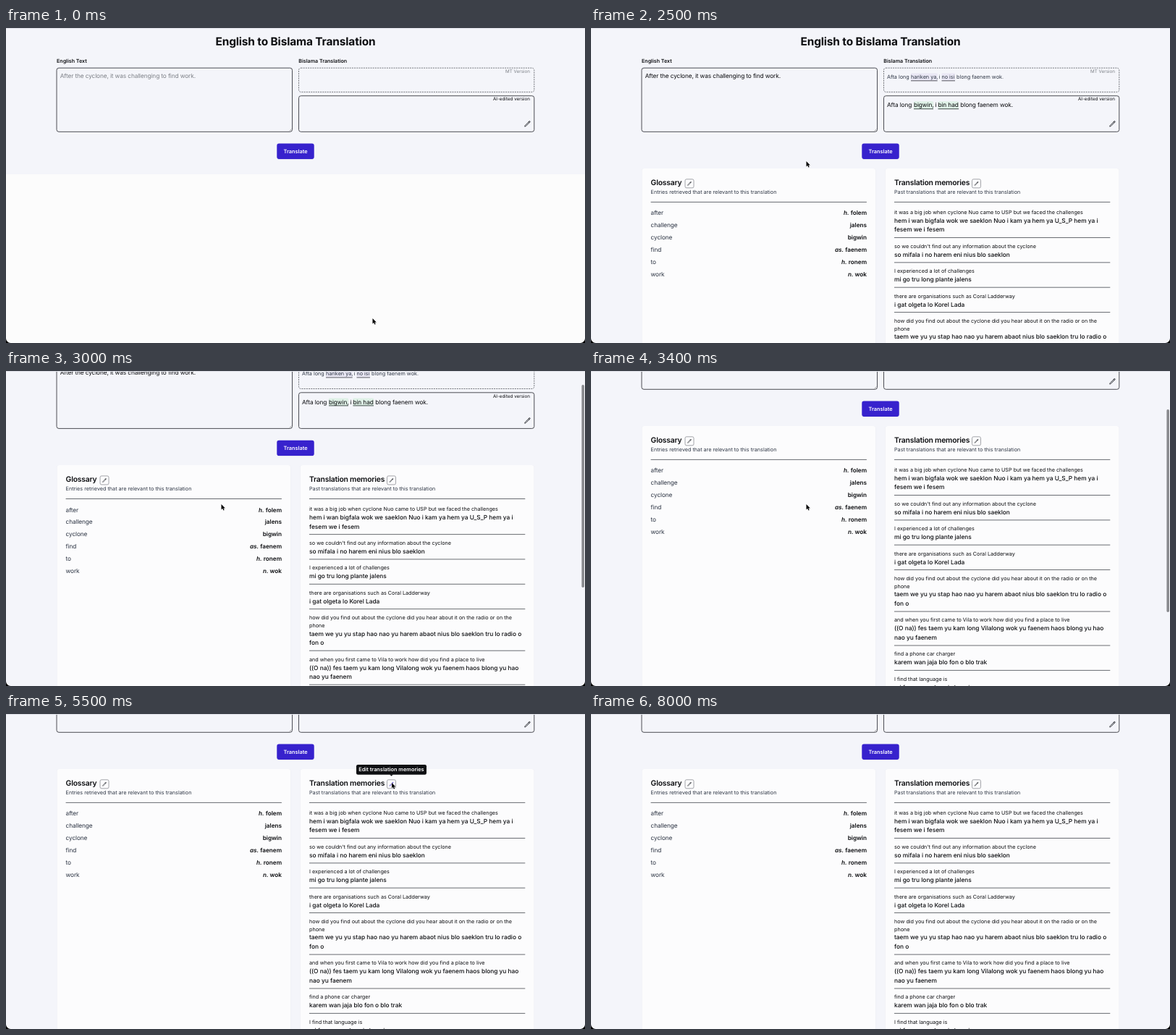
An HTML page that plays this animation: 800x435 px, repeating every 8.1 s.

```html
<!DOCTYPE html>
<html lang="en">
<head>
<meta charset="utf-8">
<title>English to Bislama Translation</title>
<style>
html, body { margin: 0; width: 100%; height: 100%; overflow: hidden; background: #fcfcfc; }
svg { display: block; width: 100vw; height: 100vh; }
text { font-family: Inter, "Open Sans", sans-serif; text-rendering: geometricPrecision; fill: #0c0d10; white-space: pre; }
.title { font-size: 15.45px; font-weight: 700; letter-spacing: -.14px; text-anchor: middle; }
.label { font-size: 7.1px; font-weight: 600; }
.tag { font-size: 6.3px; text-anchor: end; }
.body { font-size: 8.3px; letter-spacing: -.12px; }
.small { font-size: 7.22px; }
.strong { font-size: 8.18px; font-weight: 600; }
.medium { font-size: 8.35px; font-weight: 500; letter-spacing: -.02px; }
.head { font-size: 10.35px; font-weight: 600; letter-spacing: -.2px; }
.btn, .tip { font-size: 7.35px; font-weight: 600; text-anchor: middle; fill: #fff; }
.end { text-anchor: end; }
.it { font-style: italic; }
.muted { fill: #7d8087; }
.slate { fill: #2d3544; }
.box { fill: none; stroke: #3a3c42; stroke-width: .9; }
.rule { stroke: #505359; stroke-width: .85; }
.pen { fill: none; stroke: #1a1c22; stroke-linecap: round; stroke-linejoin: round; }
</style>
</head>
<body>
<svg id="stage" viewBox="0 0 800 435" preserveAspectRatio="none"></svg>
<script>
const LOOP = 8100, STEP = 100;
const FILLED = 1100, RESULTS = 1500;

const text = (x, y, cls, s, id = '') =>
  `<text ${id && `id="${id}"`} x="${x}" y="${y}" class="${cls}">${s}</text>`;
const rect = (x, y, w, h, r, attrs) =>
  `<rect x="${x}" y="${y}" width="${w}" height="${h}" rx="${r}" ${attrs}/>`;
const rule = (x, y) => `<path class="rule" d="M${x} ${y}h298.3"/>`;

const pencil = (cx, cy, k, id = '') =>
  `<path ${id && `id="${id}"`} class="pen" stroke-width="2.3" transform="translate(${cx} ${cy}) scale(${k}) translate(-12 -12)"
  d="M16.9 4.5l1.7-1.7a1.9 1.9 0 1 1 2.6 2.7L6.8 19.8a4.5 4.5 0 0 1-1.9 1.1L2.3 21.7l.8-2.6a4.5 4.5 0 0 1 1.1-1.9L16.9 4.5zm0 0L19.5 7.1"/>`;

const mark = (x, w, y, fill, line) =>
  rect(x, y, w, 10, 1, `fill="${fill}"`) + rect(x, y + 10, w, .9, 0, `fill="${line}"`);

const glossary = [
  ['after', 'h.', 'folem'], ['challenge', '', 'jalens'], ['cyclone', '', 'bigwin'],
  ['find', 'as.', 'faenem'], ['to', 'h.', 'ronem'], ['work', 'n.', 'wok']
];

const memories = [
  [['it was a big job when cyclone Nuo came to USP but we faced the challenges'],
   ['hem i wan bigfala wok we saeklon Nuo i kam ya hem ya U_S_P hem ya i', 'fesem we i fesem']],
  [["so we couldn't find out any information about the cyclone"],
   ['so mifala i no harem eni nius blo saeklon']],
  [['I experienced a lot of challenges'], ['mi go tru long plante jalens']],
  [['there are organisations such as Coral Ladderway'], ['i gat olgeta lo Korel Lada']],
  [['how did you find out about the cyclone did you hear about it on the radio or on the', 'phone'],
   ['taem we yu yu stap hao nao yu harem abaot nius blo saeklon tru lo radio o', 'fon o']],
  [['and when you first came to Vila to work how did you find a place to live'],
   ['((O na)) fes taem yu kam long Vilalong wok yu faenem haos blong yu hao', 'nao yu faenem']],
  [['find a phone car charger'], ['karem wan jaja blo fon o blo trak']],
  [['I find that language is'], ['mi faenem se lanwis hem i']]
];

function card(x, title, sub, penX, id) {
  return rect(x, 194, 323.5, 560, 3, 'fill="#e9ebf1"') +
    rect(x + .4, 194, 322.7, 560, 3, 'fill="#fcfcfd"') +
    text(x + 12.6, 217.3, 'head', title) +
    rect(penX - 6, 208.8, 12, 12, 2, 'fill="none" stroke="#8e9096" stroke-width=".8"') +
    pencil(penX, 214.9, .25, id) +
    text(x + 12.6, 229.1, 'small slate', sub) +
    rule(x + 12.6, 240.4);
}

function glossaryRows() {
  return glossary.map(([en, kind, bi], i) => {
    const y = 258.4 + i * 16.9;
    const prefix = kind && `<tspan class="it">${kind}</tspan> `;
    return text(82.6, y, 'body slate', en) + text(381, y, 'strong end', prefix + bi);
  }).join('');
}

function memoryRows() {
  let y = 254.6, out = '';
  for (const [en, bi] of memories) {
    en.forEach((s, i) => out += text(419, y + i * 10.6 + 2.3, 'small', s));
    y += (en.length - 1) * 10.6 + 11.75;
    bi.forEach((s, i) => out += text(419, y + i * 12.6 + 2.53, 'medium', s));
    y += (bi.length - 1) * 12.6 + 10.55;
    out += rule(419, y);
    y += 12.05;
  }
  return out;
}

function form() {
  return text(400, 23.6, 'title', 'English to Bislama Translation') +
    text(70, 48, 'label', 'English Text') +
    text(404.3, 48, 'label', 'Bislama Translation') +
    rect(70, 55.2, 325.5, 88.1, 3, 'class="box"') +
    '<path d="M391.5 142.5l3-3M393.3 142.7l1.4-1.4" stroke="#777" stroke-width=".6"/>' +
    text(74.7, 69.2, 'body', 'After the cyclone, it was challenging to find work.', 'input') +
    rect(404.5, 55.2, 325.3, 33.2, 3, 'class="box" stroke-dasharray="2 1.2" style="stroke:#66686e"') +
    rect(404.5, 93.7, 325.3, 49.6, 3, 'class="box"') +
    text(724, 62.3, 'tag muted', 'MT Version') +
    text(724, 100.4, 'tag', 'AI-edited version') +
    pencil(720.4, 132.4, .38) +
    rect(374.5, 160.6, 51, 21, 2.8, 'fill="#dcdcee"') +
    rect(374.3, 159.6, 51.4, 21.3, 2.8, 'id="button"') +
    text(400, 172.9, 'btn', 'Translate');
}

function translations() {
  const line = (y, cls, parts) => parts.map(([x, s]) => text(x, y, cls, s)).join('');
  const lilac = ['#e9e7f4', '#45454f'], mint = ['#dff1e7', '#2a3a33'];
  return mark(442, 36.7, 62.4, ...lilac) + mark(484.5, 18.5, 62.4, ...lilac) +
    line(70, 'small slate', [[409, 'Afta long'], [442, 'hariken ya,'], [480.4, 'i'], [484.5, 'no isi'], [505, 'blong faenem wok.']]) +
    mark(446, 27, 101.3, ...mint) + mark(479.5, 28.5, 101.3, ...mint) +
    line(109.4, 'body', [[409, 'Afta long'], [446, 'bigwin,'], [475.6, 'i'], [479.5, 'bin had'], [510.3, 'blong faenem wok.']]);
}

const tooltip = (id, cx, w, s) => `<g id="${id}">` +
  rect(cx - w / 2, 70.1, w, 13.6, 2.2, 'fill="#0f1013"') +
  `<path d="M${cx - 2.4} 83.5h4.8l-2.4 2.3z" fill="#0f1013"/>` +
  text(cx, 79.4, 'tip', s) + '</g>';

const $ = id => document.getElementById(id);
const subtitle = kind => `${kind} that are relevant to this translation`;

$('stage').innerHTML =
  rect(0, 0, 800, 435, 0, 'fill="#fcfcfc"') +
  '<g id="page">' +
    '<rect id="panel" width="800" fill="#f4f5fa"/>' + form() +
    '<g id="results">' + translations() +
      card(70, 'Glossary', subtitle('Entries retrieved'), 136, 'penA') + glossaryRows() +
      card(406.4, 'Translation memories', subtitle('Past translations'), 532.5, 'penB') + memoryRows() +
    '</g>' +
  '</g>' +
  tooltip('tipA', 136, 81, 'Edit glossary entries') +
  tooltip('tipB', 532.5, 97, 'Edit translation memories') +
  rect(0, 0, 800, 1, 0, 'fill="#dcdee5"') +
  rect(795.4, 0, 3.5, 280, 1.75, 'id="thumb" fill="#87888c"') +
  '<path d="M0 435v-6.5a6.5 6.5 0 0 0 6.5 6.5zM800 435v-6.5a6.5 6.5 0 0 1-6.5 6.5z"/>' +
  '<path id="cursor" d="M0 0V7.4L1.7 5.8 2.9 8.6 4.2 8 3 5.4H5.3Z" stroke="#fff" stroke-width=".7" paint-order="stroke"/>';

// time, x, y of the pointer tip
const track = [
  [0, 506.5, 401], [800, 398, 172], [1500, 398, 172], [2300, 297.5, 184],
  [3900, 297.5, 184], [4700, 530.7, 116.5], [5000, 533, 95], [5500, 533, 95],
  [6100, 137.3, 91.7], [6900, 137.3, 91.7], [7700, 180, 446], [LOOP, 180, 446]
];

const clamp = v => Math.max(0, Math.min(1, v));
const ease = (t, a, b) => { const p = clamp((t - a) / (b - a)); return p * p * (3 - 2 * p); };
const during = (t, a, b) => t >= a && t < b;
const show = (id, on) => $(id).setAttribute('visibility', on ? 'visible' : 'hidden');

function pointer(t) {
  const i = track.findIndex((k, n) => n && t < k[0]);
  const [a, x0, y0] = track[i - 1], [b, x1, y1] = track[i];
  const p = ease(t, a, b);
  return [x0 + (x1 - x0) * p, y0 + (y1 - y0) * p];
}

function draw(t) {
  const done = t >= RESULTS, scroll = 118 * ease(t, 2570, 3385);
  const [x, y] = pointer(t);
  $('page').setAttribute('transform', `translate(0 ${-scroll})`);
  $('panel').setAttribute('height', done ? 760 : 202);
  show('results', done);
  $('input').setAttribute('class', t < FILLED ? 'body muted' : 'body');

  const over = scroll < 1 && x > 374 && x < 425 && y > 160 && y < 181;
  $('button').setAttribute('fill', over ? '#2e1bb0' : '#3722cd');

  const onA = during(t, 6000, 7000), onB = during(t, 4900, 5600);
  show('tipA', onA);
  show('tipB', onB);
  $('penA').style.stroke = onA ? '#3722cd' : '';
  $('penB').style.stroke = onB ? '#3722cd' : '';

  $('thumb').setAttribute('y', -21.3 + .63 * scroll);
  $('thumb').setAttribute('opacity', t < 2600 ? 0 : 1 - clamp((t - 3800) / 300));
  $('cursor').setAttribute('transform', `translate(${x} ${y})`);
}

function tick() {
  const t = performance.now() % LOOP;
  draw(Math.floor(t / STEP) * STEP);
  requestAnimationFrame(tick);
}
tick();
</script>
</body>
</html>
```
